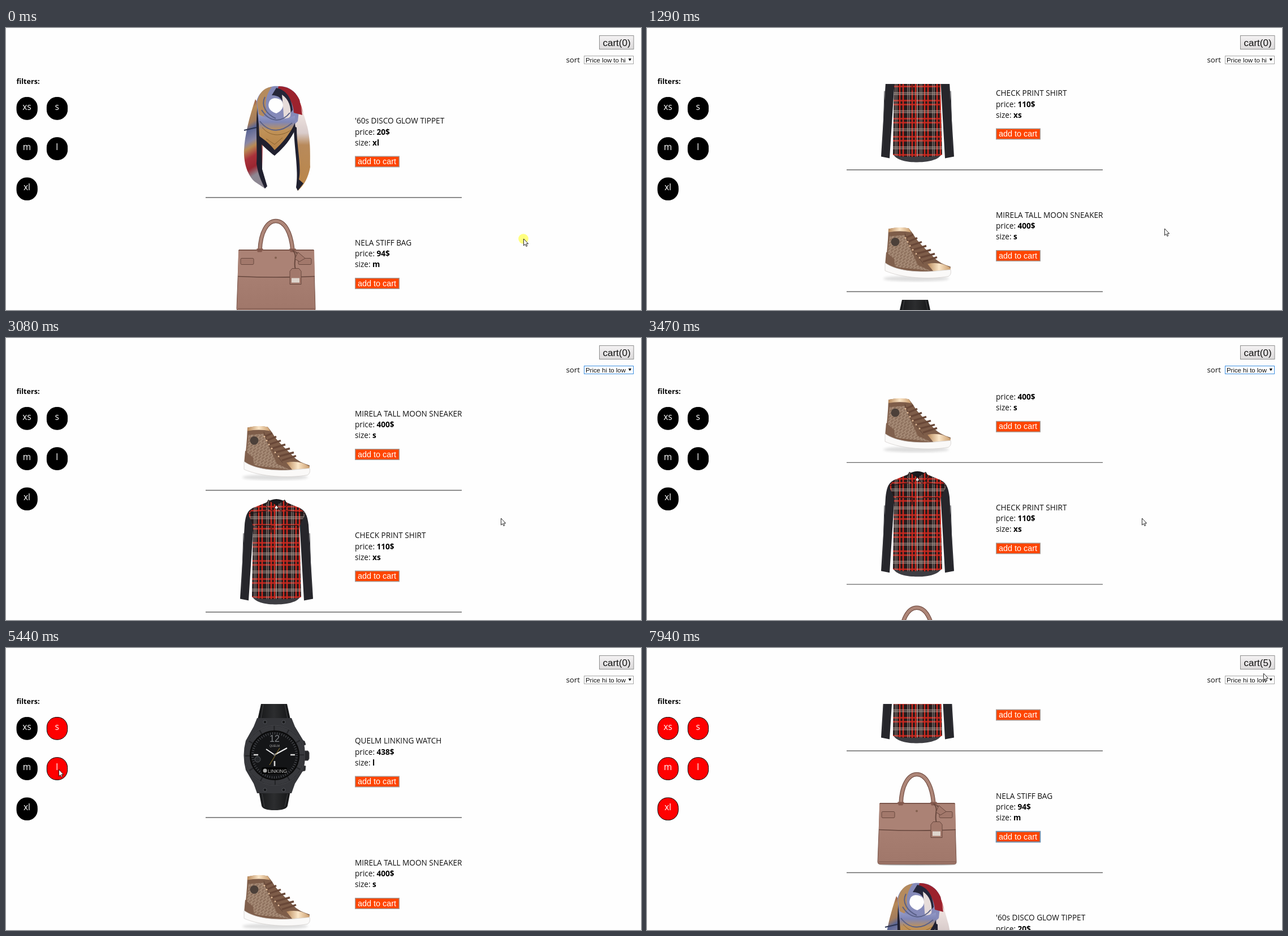
An HTML page that plays this animation: 1123x499 px, repeating every 8000 ms.

```html
<!DOCTYPE html>
<html lang="en">
<head>
<meta charset="utf-8">
<title>Shop list</title>
<style>
  html, body { margin: 0; width: 100%; height: 100%; overflow: hidden; background: #fefefe; }
  svg { display: block; width: 100%; height: 100%; }
  text { font: 13.6px "Open Sans", "Noto Sans", sans-serif; fill: #111; }
  .strong { font-weight: 700; fill: #000; }
  .ui { font-family: "Liberation Sans", Arial, sans-serif; }
  .chip { fill: #000; stroke: #000; }
  .chip.on { fill: #f00; }
  .chip-label { font-size: 15.5px; fill: #fff; text-anchor: middle; }
  .add { fill: #ff4500; stroke: #a39a96; stroke-width: 1.4; }
  .add.focus { stroke: #6f8fae; stroke-width: 2; }
  .option { font-size: 11.4px; }
</style>
</head>
<body>
<svg viewBox="0 0 1123 499">
  <defs>
    <clipPath id="window"><rect x="353" y="99" width="470" height="400"/></clipPath>
    <linearGradient id="face" x2="0" y2="1"><stop stop-color="#f4f2f3"/><stop offset="1" stop-color="#dcdadb"/></linearGradient>
    <linearGradient id="tailLeft" x2=".15" y2="1">
      <stop stop-color="#7d2a35"/><stop offset=".15" stop-color="#b78a58"/><stop offset=".3" stop-color="#a37c5c"/>
      <stop offset=".37" stop-color="#5b6695"/><stop offset=".5" stop-color="#8a87a5"/><stop offset=".57" stop-color="#b98b54"/>
      <stop offset=".68" stop-color="#a8313a"/><stop offset=".8" stop-color="#9b2631"/><stop offset=".9" stop-color="#8d8792"/>
    </linearGradient>
    <linearGradient id="tailRight" x2="0" y2="1">
      <stop stop-color="#a3212b"/><stop offset=".15" stop-color="#b13339"/><stop offset=".22" stop-color="#eee3e0"/>
      <stop offset=".42" stop-color="#d9cccb"/><stop offset=".54" stop-color="#b88a5b"/><stop offset="1" stop-color="#bb8647"/>
    </linearGradient>
    <linearGradient id="drape" x2="0" y2="1">
      <stop stop-color="#999fcb"/><stop offset=".2" stop-color="#7f86b6"/><stop offset=".4" stop-color="#c09258"/><stop offset="1" stop-color="#b37f44"/>
    </linearGradient>
    <linearGradient id="leather" x2="0" y2="1"><stop stop-color="#ad8477"/><stop offset="1" stop-color="#a0776a"/></linearGradient>
    <linearGradient id="gold"><stop stop-color="#b98a5c"/><stop offset=".5" stop-color="#fbe6c8"/><stop offset="1" stop-color="#c99b6b"/></linearGradient>
    <linearGradient id="strap"><stop stop-color="#141516"/><stop offset=".5" stop-color="#2c2d2f"/><stop offset="1" stop-color="#121314"/></linearGradient>
    <pattern id="plaid" x="467" y="293" width="22" height="32" patternUnits="userSpaceOnUse">
      <rect width="22" height="32" fill="#251a1b"/>
      <path d="M2 0V32M8 0V32M0 5H22M0 12H22" stroke="#cf2a20" stroke-width="2.4"/>
      <path d="M16 0V32M19 0V32" stroke="#b8aaa4" stroke-width=".9"/>
      <path d="M0 23H22M0 26H22" stroke="#c9bbb2" stroke-width="1"/>
    </pattern>
    <pattern id="weave" width="6" height="6" patternUnits="userSpaceOnUse" patternTransform="rotate(12)">
      <rect width="6" height="6" fill="#a88d78"/>
      <path d="M0 1H3M4 2V5M1 4L3 6" stroke="#7a5c49" stroke-width="1.2"/>
    </pattern>
    <filter id="soft"><feGaussianBlur stdDeviation="2"/></filter>

    <g id="scarf">
      <path d="M441 126C431 155 422 190 421 216C420 242 429 263 440 272L458 284L461 279L453 250L455 150Z" fill="url(#tailLeft)"/>
      <path d="M446 130C440 165 445 215 443 240C446 260 452 272 458 284L462 280L453 250L452 200L458 150Z" fill="#20202f"/>
      <path d="M421 181L443 176" stroke="#2c3450" stroke-width="2"/>
      <path d="M508 112C520 122 524 145 533 175C540 205 537 235 538 246C534 268 525 280 516 288L514 280C519 250 514 205 509 176Z" fill="url(#tailRight)"/>
      <path d="M509 174L514 176C514 210 523 245 518 268L526 275L516 288L513 282C518 250 509 210 509 174Z" fill="#20202f"/>
      <path d="M443 130C448 110 466 101 482 103C500 102 514 113 520 130L516 165L480 200L447 170Z" fill="#858ab9"/>
      <path d="M444 132C448 112 458 106 470 104C460 118 457 132 461 148L449 165Z" fill="#b58b5e"/>
      <path d="M482 103C499 103 512 112 519 127L524 154L509 150C508 130 498 116 480 110Z" fill="#9c222d"/>
      <path d="M478 106C494 109 505 122 507 145L496 160L490 138C490 125 482 119 470 119Z" fill="#25263a"/>
      <path d="M488 118C500 126 505 140 503 156L492 168L490 140Z" fill="#e6dcda"/>
      <path d="M446 152C460 162 490 165 511 155L511 176C500 198 486 214 475 224C462 207 450 196 448 190Z" fill="url(#drape)"/>
      <path d="M447 191C460 199 469 208 475 216C488 204 502 188 511 168L512 179C500 204 486 216 475 226C464 218 454 207 447 202Z" fill="#20202f"/>
      <path d="M452 145C465 166 487 169 502 150M449 165C466 187 488 184 506 168M458 122C450 137 461 153 477 160" fill="none" stroke="#596087" stroke-width="2"/>
      <path d="M453 176C467 192 486 193 505 180M460 196L475 206L489 194" fill="none" stroke="#8a622f"/>
      <path d="M465 132C467 123 479 122 487 128C494 138 488 147 478 151C468 148 462 141 465 132Z" fill="#fefefe"/>
    </g>

    <g id="bag">
      <ellipse cx="478" cy="383" rx="68" ry="2" fill="#777" filter="url(#soft)"/>
      <g fill="none">
        <path d="M449 276C450 244 462 224 477 224C493 224 504 244 507 276" stroke="#765248" stroke-width="7.5"/>
        <path d="M449 276C450 244 462 224 477 224C493 224 504 244 507 276" stroke="#ae8678" stroke-width="5"/>
      </g>
      <path d="M412 275H544L547 380Q547 383 543 383H412Q408 383 408 379Z" fill="url(#leather)" stroke="#795449"/>
      <path d="M411 276H545L546 323H410Z" fill="#ab8275"/>
      <path d="M410 322Q478 325 546 322" fill="none" stroke="#66463d" stroke-width="1.6"/>
      <path d="M411 276H545M410 379H546" stroke="#7d584d"/>
      <path d="M443 273L455 273L452 279H445ZM501 273H513L511 279H503Z" fill="#83594d"/>
      <g fill="#a2786b" stroke="#68483e">
        <rect x="415" y="290" width="23" height="11" rx="2"/><rect x="517" y="290" width="23" height="11" rx="2"/>
        <path d="M507 276C517 285 507 297 512 309M512 278L517 285" fill="none" stroke-width="2"/>
        <path d="M516 279L529 290L519 296L511 291Z"/>
        <path d="M506 308H518L522 313V336H502V313Z"/>
      </g>
      <rect x="505" y="325" width="14" height="8" fill="#ded5cd"/>
      <circle cx="477" cy="289" r="2" fill="#83604f"/>
    </g>

    <g id="shirt">
      <path d="M440 299C427 303 424 313 422 330L414 461L429 464L437 340ZM516 299C529 303 533 313 535 330L543 461L527 464L520 340Z" fill="#26262b"/>
      <path d="M420 345L417 450M537 345L540 450" stroke="#36363c"/>
      <path d="M436 448L436 458C443 468 460 471 478 471C496 471 514 468 521 457V448Z" fill="#3d3d42"/>
      <path d="M462 290L437 300L428 310L437 332L435 458Q452 463 478 461Q505 463 522 458L519 332L530 310L519 300L495 290L478 302Z" fill="url(#plaid)"/>
      <path d="M460 291Q478 278 497 291L490 298Q478 292 466 298Z" fill="#19191d"/>
      <path d="M464 286L459 296L471 306L478 295ZM493 286L498 296L486 306L478 295Z" fill="url(#plaid)" stroke="#1c1515"/>
      <path d="M478 300V461" stroke="#c7b9b1" stroke-width="1.2"/>
      <path d="M441 331H469V344M488 331H516V344M430 310L463 305M494 305L529 310" fill="none" stroke="#1a1214"/>
    </g>

    <g id="sneaker">
      <ellipse cx="476" cy="246" rx="58" ry="5" fill="#ddd" filter="url(#soft)"/>
      <path d="M427 158Q446 154 463 157L470 166C480 184 497 197 508 209Q517 219 537 225L534 239L470 241L421 225Q426 190 427 158Z" fill="#7e5d49"/>
      <path d="M429 171L455 169L479 222L501 232L446 226Q428 221 424 214Z" fill="url(#weave)"/>
      <path d="M423 199L437 211L439 227L421 222Z" fill="#80604d"/>
      <path d="M427 158Q446 153 463 157L467 164Q447 160 427 164Z" fill="url(#gold)"/>
      <path d="M496 220Q518 215 537 227L535 235L508 235Z" fill="url(#gold)"/>
      <path d="M421 218C440 232 475 235 505 233L537 230Q539 239 533 242C500 248 450 245 421 232Z" fill="#faf9f8" stroke="#d4d0cd" stroke-width=".8"/>
      <path d="M456 166L464 188L489 220" fill="none" stroke="#5e4234"/>
      <path d="M457 174L471 168M461 181L478 174M465 188L486 181M470 195L494 188M476 202L502 195M482 209L509 202M488 216L513 208" stroke="#694838" stroke-width="3.4"/>
      <path d="M457 174h.1M461 181h.1M465 188h.1M470 195h.1M476 202h.1M482 209h.1" stroke="#dfb996" stroke-width="3" stroke-linecap="round"/>
      <circle cx="439" cy="181" r="7.5" fill="#4c4039"/>
    </g>

    <g id="watch">
      <path d="M451 99H497L505 135H443ZM446 248H504L498 279Q496 287 475 287Q454 287 452 279Z" fill="url(#strap)"/>
      <path d="M455 100L450 130M493 100L499 130M453 258L457 281M498 258L493 281" stroke="#404144"/>
      <path d="M520 161L528 165L530 171L522 174ZM520 207L530 209L529 217L520 219ZM525 182H534L536 185V196L534 199H525Z" fill="#26272a" stroke="#48494c"/>
      <path d="M444 124H505L511 139L526 164Q532 190 526 216L511 240L505 257H444L438 240L424 216Q417 190 424 164L438 139Z" fill="#35363a"/>
      <circle cx="475" cy="190" r="53" fill="#222326" stroke="#45464a"/>
      <circle cx="475" cy="190" r="48" fill="none" stroke="#38393d" stroke-width="8" stroke-dasharray="23 2.13"/>
      <circle cx="475" cy="190" r="43" fill="#141517" stroke="#090909" stroke-width="2"/>
      <circle cx="475" cy="190" r="39" fill="none" stroke="#606267" stroke-width="4" stroke-dasharray=".8 3.284"/>
      <g fill="#17181a" stroke="#505257">
        <circle cx="458" cy="131" r="3"/><circle cx="491" cy="131" r="3"/><circle cx="458" cy="251" r="3"/><circle cx="491" cy="251" r="3"/>
      </g>
      <circle cx="445" cy="197" r="5" fill="#25272a" stroke="#55585c"/>
      <path d="M438 189H446M503 189H511M475 200V209" stroke="#d6d6d6" stroke-width="2.6"/>
      <path d="M475 189L460 179M475 189L497 177" stroke="#eee" stroke-width="2"/>
      <path d="M484 177L466 207" stroke="#9a8032"/>
      <circle cx="475" cy="189" r="2" fill="#777"/>
      <text class="ui" x="475" y="166" text-anchor="middle" style="font-size:16px;fill:#85888c">12</text>
      <text class="ui" x="475" y="175" text-anchor="middle" style="font-size:5px;fill:#b5b5b5">QUELM</text>
      <rect x="452" y="211" width="45" height="12" rx="3" fill="#050505"/>
      <circle cx="458" cy="217" r="3.5" fill="#aaa"/>
      <text class="ui" x="463" y="220.5" style="font-size:8.5px;fill:#ccc">LINKING</text>
    </g>
  </defs>

  <rect width="1123" height="499" fill="#fefefe"/>
  <text class="strong" x="18.5" y="98.5" style="font-size:12.6px">filters:</text>
  <g id="chips"></g>
  <g id="list" clip-path="url(#window)"></g>
  <text id="loading" x="496" y="251" style="font-size:20px">loading....</text>
  <g id="header">
    <rect x="1049.5" y="13.5" width="60.5" height="24" fill="url(#face)" stroke="#8d8d8d"/>
    <text id="cart" class="ui" x="1055.5" y="31.5" style="font-size:17px"></text>
    <text x="990.5" y="60.5" style="font-size:13.3px">sort</text>
    <rect id="select" x="1022.5" y="49.5" width="87" height="14" fill="#fff"/>
    <text id="choice" class="ui option" x="1025" y="60.5"></text>
    <path d="M1100.7 54H1106L1103.3 58.5Z"/>
  </g>
  <g id="menu">
    <rect x="1022.5" y="64.5" width="87" height="29" fill="#fff" stroke="#8a8a8a"/>
    <rect id="hover" x="1023" width="86" height="14" fill="#1e90ff"/>
    <text class="ui option" x="1025" y="75.5">Price low to hi</text>
    <text class="ui option" x="1025" y="89.5">Price hi to low</text>
  </g>
  <g id="pointer">
    <circle id="press" r="8.8" fill="#ff0" fill-opacity=".5"/>
    <path id="arrow" d="M.5 0V12L3.2 9.5L5 13.5L6.8 12.7L5.1 8.8H8.7Z" fill="#fff" stroke="#111" stroke-width=".9"/>
    <path id="beam" d="M-1-6H1M3-6H1V6M-1 6H3" fill="none" stroke="#ddd"/>
  </g>
</svg>

<script>
const LOOP = 8000, PITCH = 215.5, FIRST_LINE = 300;
const $ = id => document.getElementById(id);
const show = (el, on) => el.setAttribute('display', on ? 'inline' : 'none');
const move = (el, x, y) => el.setAttribute('transform', `translate(${x} ${y})`);

// line: height of the divider in the artwork's own coordinates
const products = [
  { art: 'scarf', title: "'60s DISCO GLOW TIPPET", price: 20, size: 'xl', line: 300 },
  { art: 'bag', title: 'NELA STIFF BAG', price: 94, size: 'm', line: 398 },
  { art: 'shirt', title: 'CHECK PRINT SHIRT', price: 110, size: 'xs', line: 484.5 },
  { art: 'sneaker', title: 'MIRELA TALL MOON SNEAKER', price: 400, size: 's', line: 269 },
  { art: 'watch', title: 'QUELM LINKING WATCH', price: 438, size: 'l', line: 300 }
];

$('list').innerHTML = products.map(p => `<g>
  <use href="#${p.art}" y="${-p.line}"/>
  <text x="617" y="-131">${p.title}</text>
  <text x="617" y="-111.5">price: <tspan class="strong">${p.price}$</tspan></text>
  <text x="617" y="-92.5">size: <tspan class="strong">${p.size}</tspan></text>
  <rect class="add" x="617.7" y="-72.8" width="77.6" height="18.6"/>
  <text class="ui" x="622" y="-59" style="font-size:14.4px;fill:#fff">add to cart</text>
  <path d="M353 0H806" stroke="#666" stroke-width="1.3"/></g>`).join('');
products.forEach((p, i) => {
  p.node = $('list').children[i];
  p.button = p.node.querySelector('.add');
});

const sizes = ['xs', 's', 'm', 'l', 'xl'];
$('chips').innerHTML = sizes.map((size, i) => {
  const x = 19 + i % 2 * 53.3, y = 122.5 + (i >> 1) * 71.2;
  return `<rect class="chip" x="${x}" y="${y}" width="36.3" height="39.7" rx="17.5"/>
    <text class="chip-label" x="${x + 18}" y="${y + 22.5}">${size}</text>`;
}).join('');
const chips = [...document.querySelectorAll('.chip')];

// the screen refreshes in bursts: start, end, number of refreshes
const bursts = [[0, 0, 1], [40, 740, 10], [1290, 1920, 9], [2070, 2070, 1], [2310, 2450, 3],
  [2920, 3700, 11], [3790, 4180, 6], [4500, 5270, 11], [5440, 5440, 1], [5600, 6220, 9],
  [6360, 6760, 6], [6930, 7270, 6], [7500, 7710, 4], [7890, 7940, 2]];
const scrollKeys = [[0, 0], [584, 434], [740, 560], [1290, 480], [1526, 0], [2450, 0], [2920, 82],
  [3076, 246], [3310, 492], [3700, 0], [7270, 0], [7500, 120], [7570, 300], [7640, 300], [7710, 549]];
const pointerKeys = [[0, 915, 373], [40, 915, 355], [1526, 915, 355], [1684, 1066, 57], [1841, 1066, 57],
  [1920, 1066, 86], [2310, 1066, 86], [2450, 875, 319], [3700, 875, 319], [4024, 92.5, 134.5],
  [4730, 92.5, 134.5], [5190, 93, 215], [5600, 93, 215], [5677, 40, 213], [5832, 38, 215],
  [5987, 36, 285], [6065, 36, 285], [6220, 36, 142], [6360, 36, 142], [6760, 652, 238],
  [7000, 652, 238], [7134, 655, 453], [7270, 655, 453], [7570, 655, 367], [7640, 655, 367],
  [7710, 655, 336], [7890, 655, 336], [7940, 1090, 45]];
const presses = [[0, 40], [1762, 1840], [1920, 2070], [4024, 4180], [5190, 5270], [5677, 5755],
  [5987, 6065], [6220, 6360], [6930, 7060], [7202, 7270], [7640, 7710], [7890, 7940]];
const loads = [[2070, 2310], [4180, 4500], [5270, 5440], [5677, 5832], [5987, 6142], [6220, 6360]];
const filterTimes = { s: 4180, l: 5270, m: 5677, xl: 5987, xs: 6220 };
const clicks = [[6930, 'watch'], [6998, 'watch'], [7202, 'sneaker'], [7640, 'shirt'], [7890, 'bag']];

const within = (ranges, t) => ranges.some(([a, b]) => t >= a && t < b);

function refreshTime(t) {
  const [start, end, count] = bursts.findLast(b => b[0] <= t);
  if (count === 1) return start;
  const gap = (end - start) / (count - 1);
  return Math.min(end, start + Math.floor((t - start) / gap + 1e-6) * gap);
}

function valueAt(keys, t) {
  const next = keys.findIndex(k => k[0] > t);
  if (next < 0) return keys.at(-1).slice(1);
  const a = keys[next - 1], b = keys[next], part = (t - a[0]) / (b[0] - a[0]);
  return a.slice(1).map((v, i) => v + (b[i + 1] - v) * part);
}

function render(time) {
  const t = refreshTime(time);
  const active = sizes.filter(size => t >= filterTimes[size]);
  const loading = within(loads, t);
  const descending = t >= 2070;
  const visible = products.filter(p => !active.length || active.includes(p.size));
  if (descending) visible.reverse();
  const [scroll] = valueAt(scrollKeys, t);
  const done = clicks.filter(c => t >= c[0]);
  const focused = done.at(-1)?.[1];

  products.forEach(p => {
    const index = visible.indexOf(p);
    show(p.node, !loading && index >= 0);
    move(p.node, 0, FIRST_LINE + PITCH * index - scroll);
    p.button.classList.toggle('focus', p.art === focused);
  });
  chips.forEach((chip, i) => chip.classList.toggle('on', active.includes(sizes[i])));
  show($('loading'), loading);

  // without a scrollbar the header sits further right
  move($('header'), loading || visible.length < 2 ? 12 : 0, 0);
  $('cart').textContent = `cart(${done.length})`;
  $('choice').textContent = descending ? 'Price hi to low' : 'Price low to hi';
  $('select').setAttribute('stroke', t >= 1762 && t < 4180 ? '#3d8fe0' : '#a6a6a6');
  show($('menu'), t >= 1762 && t < 2070);
  $('hover').setAttribute('y', t < 1920 ? 65 : 79);

  const [x, y] = valueAt(pointerKeys, t);
  const overText = t >= 4024 && t < 4730;
  move($('pointer'), x, y);
  show($('press'), within(presses, t));
  show($('beam'), overText);
  show($('arrow'), !overText);
}

const origin = performance.now();
function tick() {
  render((performance.now() - origin) % LOOP);
  requestAnimationFrame(tick);
}
tick();
</script>
</body>
</html>
```
